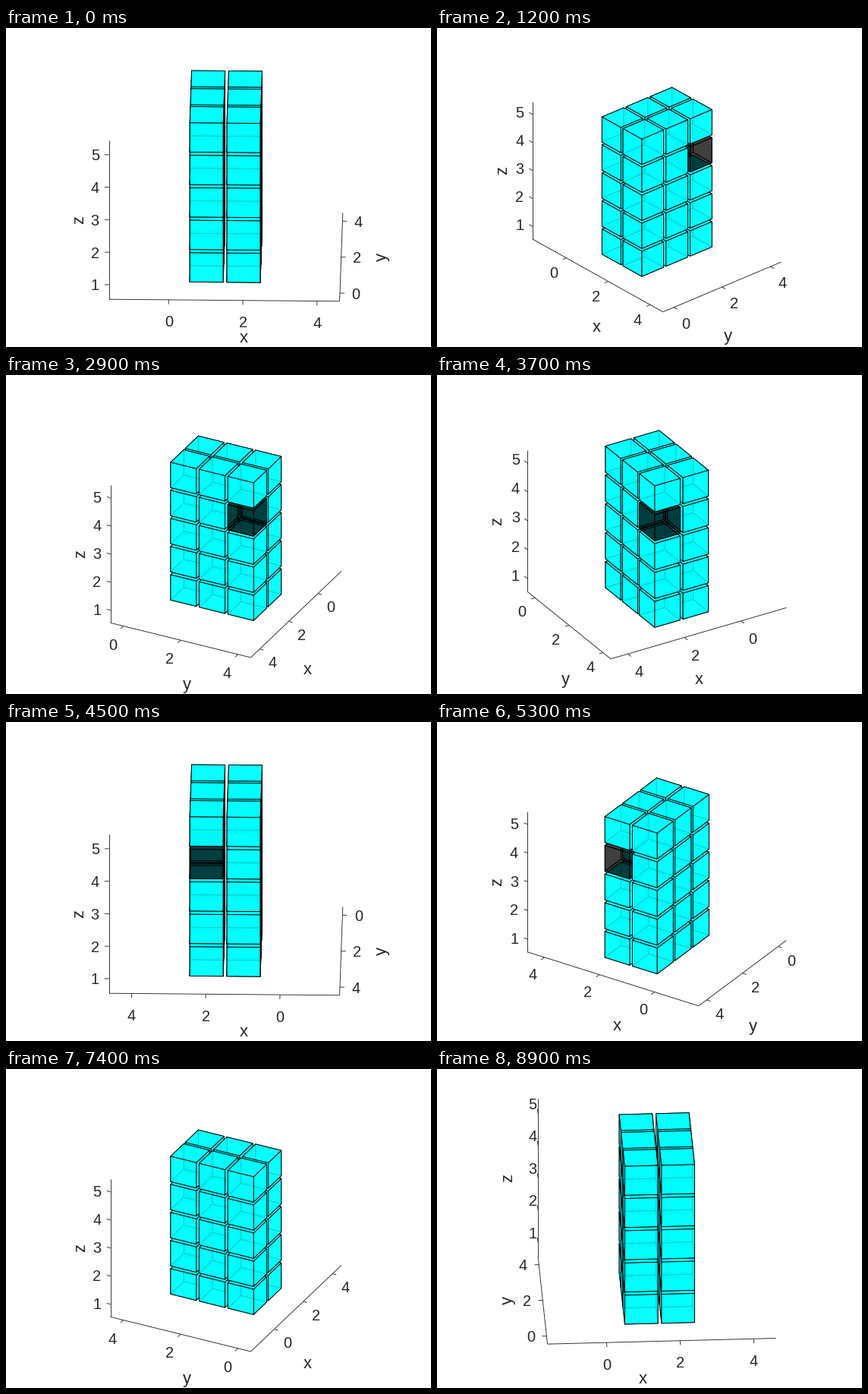
Write a matplotlib script that moves like this. It is 560 px wide and 420 px high and loops after 9000 ms.

```python
import itertools

import matplotlib.pyplot as plt
import numpy as np
from matplotlib.animation import FuncAnimation
from matplotlib.collections import LineCollection, PolyCollection

W, H, DPI = 560, 420, 100
PX = 72 / DPI                      # one pixel in points
FRAMES, STEP = 90, 4
EL = np.radians(29)
SE, CE = np.sin(EL), np.cos(EL)
CENTER = np.array([1.5, 2.0, 3.0])
HALF = np.array([2.45 * 434 / 342.3, 2.45, 2.45])
MID_X, TOP, BOTTOM = 289.8, 31.5, 373.8
LABEL_FLOOR = 408.5                # lowest place for an axis label
TICKS = [(0, 2, 4), (0, 2, 4), (1, 2, 3, 4, 5)]
INK = "#262626"
CYAN, DARK = (0, 1, 1, 0.8), (0, 0, 0, 0.5)
DARK_CUBE = (2, 3, 4)

plt.rcParams["font.family"] = "Liberation Sans"
fig = plt.figure(figsize=(W / DPI, H / DPI), dpi=DPI, facecolor="white")
ax = fig.add_axes([0, 0, 1, 1])
ax.set_xlim(0, W)
ax.set_ylim(H, 0)
ax.axis("off")


def cube_face(center, axis, side):
    u, v = [a for a in range(3) if a != axis]
    quad = np.zeros((4, 3))
    quad[:, axis] = side
    quad[:, u] = [-1, 1, 1, -1]
    quad[:, v] = [-1, -1, 1, 1]
    return center - CENTER + 0.45 * quad


cubes = list(itertools.product((1, 2), (1, 2, 3), range(1, 6)))
sides = list(itertools.product(range(3), (-1, 1)))
faces = {(c, s): cube_face(np.array(c), *s) for c in cubes for s in sides}

axis_lines = LineCollection([], colors=INK, linewidths=0.9 * PX)
boxes = PolyCollection([], edgecolors="black", linewidths=0.9 * PX)
ax.add_collection(axis_lines)
ax.add_collection(boxes)


def text(s, size, va):
    return ax.text(0, 0, s, fontsize=size * PX, color=INK, ha="center", va=va)


tick_texts = [[text(str(t), 20, "center_baseline") for t in row] for row in TICKS]
names = [text(s, 22, "center") for s in "xyz"]
names[2].set_rotation(90)


def is_upright(d):
    return abs(d[1]) < 0.06


def tick_offset(d):
    side = np.sign(d[0])
    if is_upright(d):
        return np.array([21 * side, 0])
    x = 0 if abs(d[0]) < 0.35 else 12 * d[0] + 5.5 * side
    return np.array([x, 13.5 + 14.5 * d[1]])


def name_offset(d):
    side = np.sign(d[0])
    if is_upright(d):
        x = 52 + 150 * abs(d[1]) if side > 0 else 43 + 100 * abs(d[1])
        return np.array([side * x, 0])
    x = -25 + 43 * d[0] ** 2 if side > 0 else -26 + 33 * d[0] ** 2
    return np.array([side * x, 80 - 30 * d[1]])


def unit(v):
    return v / np.hypot(*v)


def draw(n):
    az = np.radians(1 + STEP * n)
    sa, ca = np.sin(az), np.cos(az)
    # screen directions of the data axes, y pointing down
    basis = np.array([[ca, sa * SE], [sa, -ca * SE], [0, -CE]])
    near = np.sign([sa, -ca])
    left = -np.sign([ca, sa])
    out = [unit(near[1] * basis[1]), unit(near[0] * basis[0])]

    # fit the box between the top margin and the labels
    height = 2 * HALF @ np.abs(basis[:, 1])
    bottom = BOTTOM
    for a in (0, 1):
        if not is_upright(out[a]):
            k = HALF[a] * abs(basis[a, 1]) / height
            room = LABEL_FLOOR - name_offset(out[a])[1]
            bottom = min(bottom, (room - TOP * k) / (1 - k))
    scale = (bottom - TOP) / height
    origin = np.array([MID_X, (TOP + bottom) / 2])

    def project(p):
        return origin + scale * (np.asarray(p) @ basis)

    lines = []
    anchors = [np.append(near, -1) * HALF, np.append(near, -1) * HALF,
               np.append(left, 0) * HALF]
    out.append(unit((left - near) * HALF[:2] @ basis[:2]))
    for a in range(3):
        def at(value):
            p = anchors[a].copy()
            p[a] = value
            return project(p)

        d = out[a]
        lines.append([at(-HALF[a]), at(HALF[a])])
        if a < 2:
            shift, name_shift = tick_offset(d), name_offset(d)
            names[a].set_rotation(90 if is_upright(d) else 0)
        else:
            shift = np.array([13 * d[0] - 5.5, 13 * d[1] * abs(d[1])])
            name_shift = np.array([-39.5, 0])
        for value, label in zip(TICKS[a], tick_texts[a]):
            p = at(value - CENTER[a])
            lines.append([p, p + 0.12 * scale * d])
            label.set_position(p + shift)
        names[a].set_position(at(0) + name_shift)
    axis_lines.set_segments(lines)

    # paint cubes from far to near, hidden faces first
    view = np.array([sa * CE, -ca * CE, SE])
    polys, colors = [], []
    for c in sorted(cubes, key=lambda c: view @ c):
        for s in sorted(sides, key=lambda s: s[1] * view[s[0]]):
            polys.append(project(faces[c, s]))
            colors.append(DARK if c == DARK_CUBE else CYAN)
    boxes.set_verts(polys)
    boxes.set_facecolor(colors)
    return [axis_lines, boxes]


anim = FuncAnimation(fig, draw, frames=FRAMES, interval=100, repeat=True,
                     repeat_delay=0, blit=False)
plt.show()
```
